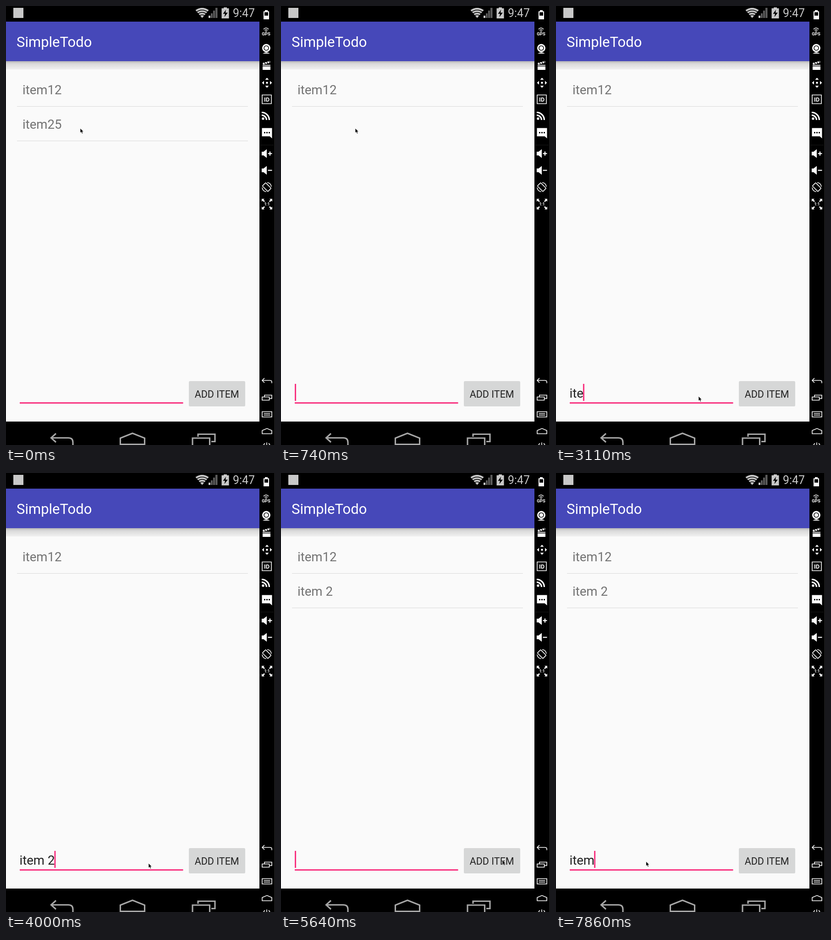
Animation, 587 px wide and 955 px high, one loop 8 s. Source, as an HTML page:

```html
<!DOCTYPE html>
<html lang="en">
<meta charset="utf-8">
<title>SimpleTodo</title>
<style>
  html, body { margin: 0; width: 100%; height: 100%; overflow: hidden; background: #000 }
  svg { display: block }
  text { font: 27.6px Roboto, sans-serif; white-space: pre }
  .line { fill: none; stroke: #fff; stroke-width: 1.6 }
  .nav { fill: none; stroke: #a6a6a6; stroke-width: 3.2 }
  .list { fill: #737373 }
  .label { font: bold 9.5px Roboto, sans-serif; text-anchor: middle }
</style>
<svg width="587" height="955" viewBox="0 0 587 955">
  <defs>
    <linearGradient id="shade" x2="0" y2="1">
      <stop offset="0" stop-opacity=".27"/>
      <stop offset=".3" stop-opacity=".13"/>
      <stop offset="1" stop-opacity=".04"/>
    </linearGradient>
  </defs>
  <rect width="587" height="955"/>

  <!-- status bar -->
  <g fill="#c8c8c8">
    <rect x="16" y="4" width="22" height="22"/>
    <path d="M428 26L413.500 9Q428-1 442.500 9Z"/>
    <path fill="none" stroke="#000" stroke-width="1.7" d="M415 13.500Q428 4 441 13.500M418 17.500Q428 10 438 17.500M422 21.500Q428 17 434 21.500"/>
    <path d="M442 21h4v5h-4z"/>
    <path fill="#5c5c5c" d="M447 16h4v10h-4zM452 10h4v16h-4zM457 4h4.500v22H457z"/>
    <path d="M475 3h7v2h4.500v22h-16V5h4.500z"/>
    <path fill="#000" d="M480 8L473.500 17H478L476.500 24L484 14.500H479Z"/>
    <text x="495" y="24" style="font-size:24.9px">9:47</text>
  </g>

  <!-- app -->
  <rect y="34" width="553" height="870" fill="#fafafa"/>
  <rect y="120" width="553" height="18" fill="url(#shade)"/>
  <rect y="34" width="553" height="86" fill="#4648b9"/>
  <text x="23" y="89" fill="#fff" style="font-size:31px">SimpleTodo</text>
  <text class="list" x="36" y="192">item12</text>
  <path d="M24 218.500H528" stroke="#dadada"/>
  <g id="row">
    <path d="M24 293.500H528" stroke="#dadada"/>
    <text id="second" class="list" x="36" y="267"/>
    <rect id="press" x="24" y="219" width="504" height="74.500"/>
  </g>
  <text id="field" x="29.500" y="852" fill="#212121"/>
  <rect x="30" y="862" width="356.500" height="3" fill="#f8327f"/>
  <rect id="caret" y="822" width="3" height="37" fill="#f8327f"/>
  <rect id="button" x="399" y="816" width="123" height="55" rx="2.500"/>
  <text x="411.700" y="851.500" fill="#212121" style="font-size:21.5px">ADD ITEM</text>

  <!-- navigation bar -->
  <g class="nav">
    <path d="M109 930L98.500 939.500L109 949M98.500 939.500H136Q146 939.500 146 949V955"/>
    <path d="M249.500 953.500V940L276 929.500L302.500 940V953.500Z"/>
    <path d="M407 957V940H444.500V957M419 937V931.500H456V947.500H448"/>
  </g>

  <!-- emulator tools -->
  <path d="M586.500 0V955" stroke="#333"/>
  <path d="M555 302.500H585" stroke="#444" stroke-dasharray="1 2"/>
  <g fill="#fff">
    <g transform="translate(568 19)">
      <path d="M-3-10h6v2.500h3V10H-6V-7.500h3z"/>
      <path fill="#000" d="M-4-5.500h8V2h-8z"/>
    </g>
    <g transform="translate(567.500 55)">
      <path class="line" d="M-5.500-4.500Q0-10 5.500-4.500M-3-2Q0-5 3-2"/>
      <circle r="1.200"/>
      <text class="label" y="8.500">GPS</text>
    </g>
    <g transform="translate(568 93)">
      <circle cy="-1.500" r="9"/>
      <circle cy="-1.500" r="5" fill="none" stroke="#000" stroke-width="1.500"/>
      <path d="M-8 10.500Q0 5 8 10.500Z"/>
    </g>
    <g transform="translate(569 129)">
      <path d="M-9-1H8V10H-9ZM-9-5L7-9.500L8-5.500L-8-1.500Z"/>
      <path stroke="#000" stroke-width="1.600" d="M-5-6.500L-3-2.500M0-8L2-4M5-9L7-5M-9 1.500H8"/>
    </g>
    <g transform="translate(569.500 167)">
      <path id="tip" d="M-4-6.500L0-11L4-6.500Z"/>
      <use href="#tip" transform="rotate(90)"/>
      <use href="#tip" transform="rotate(180)"/>
      <use href="#tip" transform="rotate(270)"/>
      <path d="M-2-2h4v4h-4z"/>
    </g>
    <g transform="translate(569 203)">
      <path class="line" d="M-10-9.500h20v19h-20z"/>
      <text class="label" y="4.500" style="font-size:13px">ID</text>
    </g>
    <g transform="translate(558 248)">
      <circle cx="3" cy="-3" r="2.700"/>
      <path class="line" style="stroke-width:3.2" d="M0-10.500A10.500 10.500 0 0 1 10.500 0M0-16.500A16.500 16.500 0 0 1 16.500 0"/>
    </g>
    <g transform="translate(569.500 276)">
      <path d="M-11-10.500H11V12L6 7.500H-11Z"/>
      <path stroke="#000" stroke-width="2.800" d="M-6.500-.5h2.800M-1.400-.5h2.800M3.700-.5h2.800"/>
    </g>
    <g id="speaker" transform="translate(558 321)">
      <path d="M0-4H4L11-9.500V9.500L4 4H0Z"/>
      <path class="line" style="stroke-width:2.2" d="M13.500 0h9"/>
    </g>
    <path class="line" style="stroke-width:2.2" d="M576 316.500v9"/>
    <use href="#speaker" y="36.500"/>
    <g transform="translate(569 394)" class="line">
      <rect x="-5" y="-8.500" width="10" height="17" rx="1" transform="rotate(-45)"/>
      <path d="M1-10Q9-9 10-1M-1 10Q-9 9-10 1"/>
    </g>
    <g transform="translate(569.500 431)">
      <path id="corner" d="M-11.500-11.500H-5.500L-7.500-9.500L-4.500-6.500L-6.500-4.500L-9.500-7.500L-11.500-5.500Z"/>
      <use href="#corner" transform="scale(-1 1)"/>
      <use href="#corner" transform="scale(1 -1)"/>
      <use href="#corner" transform="scale(-1)"/>
      <text class="label" y="3" style="font-size:8.5px">1:1</text>
    </g>
    <g class="line">
      <path d="M564 809.500L559 814.500L564 819.500M559 814.500H576Q580 814.500 580 818V820.500"/>
      <path d="M559 850.500h15.500v7H559zM564 850V846.500H580V854H575"/>
      <path d="M559 882.500h21v11.500h-21zM562.500 886.500h14M562.500 890h14"/>
      <path d="M559 930.500V923.500L569.500 919L580 923.500V930.500Z"/>
      <path d="M569 949.500V955M565 951.500Q562 953 562 957M573 951.500Q576 953 576 957"/>
    </g>
  </g>

  <path id="pointer" stroke="#fff" stroke-width=".7" d="M0 0V10L2.300 8L3.900 11.700L5.700 10.900L4.200 7.400H7.300Z"/>
</svg>
<script>
const LOOP = 8000, TICK = LOOP / 54;   // the picture refreshes once per tick
const REMOVED = 740, PRESSED = 5440, ADDED = 5500;
const BLINK = 500, FIRST_BLINK = -690;

const el = id => document.getElementById(id);
const [row, second, press, field, caret, button, pointer] =
  ['row', 'second', 'press', 'field', 'caret', 'button', 'pointer'].map(el);

const typing = [
  { text: 'item 2', keys: [2850, 2960, 3070, 3180, 3500, 3920] },
  { text: 'item', keys: [7380, 7600, 7680, 7800] }
];
const edits = [FIRST_BLINK, ADDED, ...typing.flatMap(run => run.keys)];

const home = { x: 162, y: 266 };
const moves = [
  { from: 1080, to: 1480, x: 410, y: 923 },
  { from: 1480, to: 1630, x: 311, y: 842 },
  { from: 1630, to: 1920, x: 311, y: 849 },
  { from: 4650, to: 5030, x: 483, y: 842 },
  { from: 5830, to: 6220, x: 330, y: 458 },
  { from: 6220, to: 6660, x: 196.5, y: 845 }
];

const ramp = (t, from, to) => Math.min(1, Math.max(0, (t - from) / (to - from)));
const ease = p => p * p * (3 - 2 * p);

function pointerAt(t) {
  let { x, y } = home;
  for (const move of moves) {
    const p = ease(ramp(t, move.from, move.to));
    x += (move.x - x) * p;
    y += (move.y - y) * p;
  }
  return `translate(${x} ${y})`;
}

function typedAt(t) {
  const { text, keys } = typing[t < ADDED ? 0 : 1];
  return text.slice(0, keys.filter(key => key <= t).length);
}

function caretShown(t) {
  const lastEdit = Math.max(...edits.filter(edit => edit <= t));
  return (t - lastEdit) % (2 * BLINK) < BLINK;
}

function draw(now) {
  const t = Math.floor((now % LOOP + 10) / TICK) * TICK % LOOP;
  const item = t < REMOVED ? 'item25' : t < ADDED ? '' : 'item 2';
  second.textContent = item;
  row.setAttribute('visibility', item ? 'visible' : 'hidden');
  press.setAttribute('opacity', t < REMOVED ? .195 * ramp(t, 0, 3 * TICK) : 0);
  field.textContent = typedAt(t);
  caret.setAttribute('x', Math.max(30, 28.5 + field.getComputedTextLength()));
  caret.setAttribute('opacity', +caretShown(t));
  button.setAttribute('fill', t > PRESSED && t < ADDED ? '#c2c3c3' : '#d6d7d7');
  pointer.setAttribute('transform', pointerAt(t));
  requestAnimationFrame(draw);
}
draw(performance.now());
</script>
</html>
```
